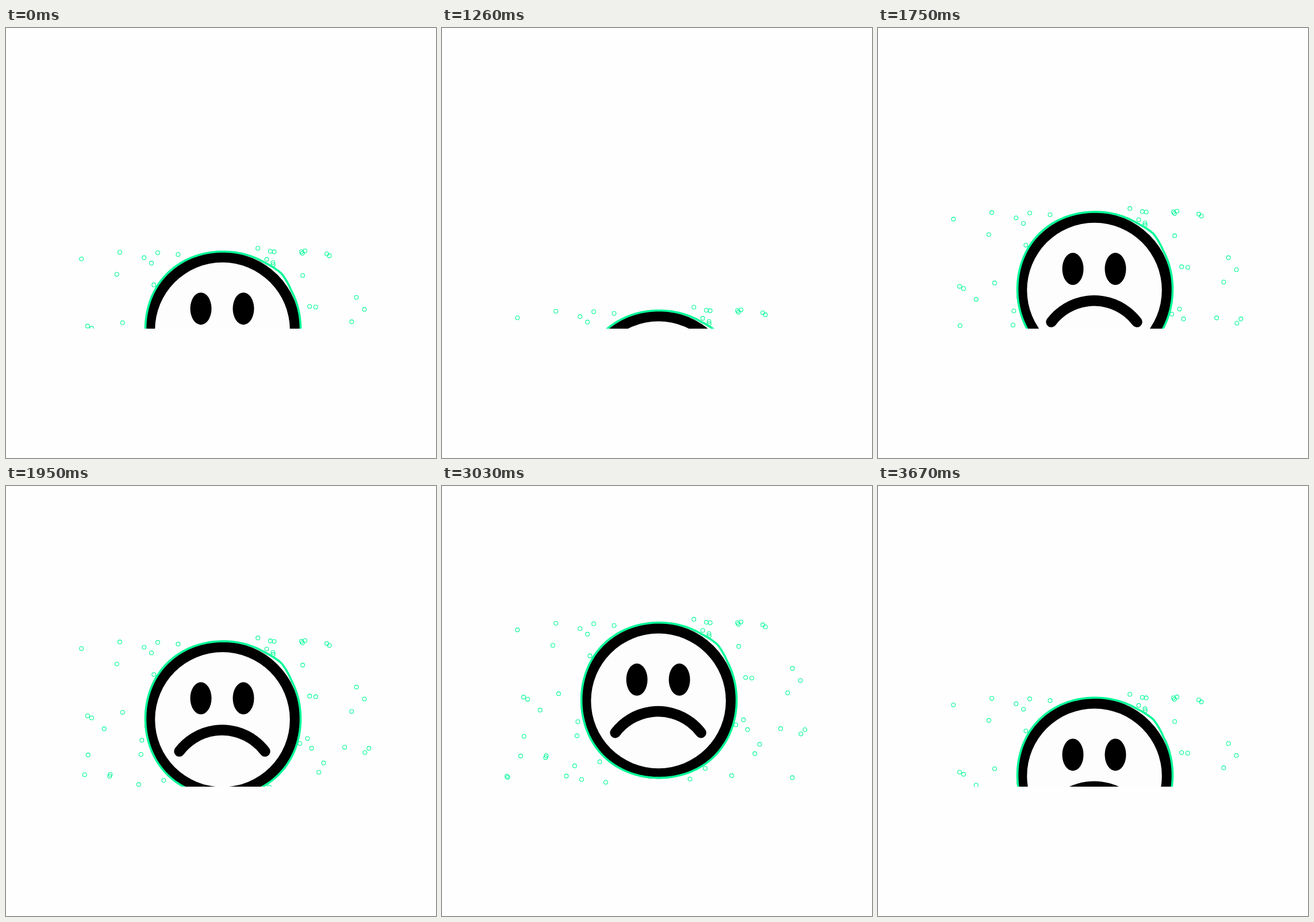
Recreate the animation shown at these times as an HTML page with a canvas. Size 748x748 px, loop 3730 ms.

```html
<!DOCTYPE html>
<html lang="en">
<head>
<meta charset="utf-8">
<title>Sad face</title>
<style>
  html, body { margin: 0; width: 100%; height: 100%; overflow: hidden; background: #fefefe; }
  canvas { display: block; }
</style>
</head>
<body>
<canvas id="stage" width="748" height="748"></canvas>
<script>
const ctx = document.getElementById('stage').getContext('2d');
const SIZE = 748, FLOOR = 523;
const PAPER = '#fefefe', INK = '#000', MINT = '#00fa96';
const CX = 376.5, CY = 373.5, FACE_RADIUS = 135.5;

// Cycle time counts from the moment the face starts to sink.
const LOOP = 3730, START = 700, HIDDEN = 1160, RISE = 1870, REST = 2970;
const PACE = [[0, 80], [400, 60], [760, 40], [RISE, 40], [2270, 60], [2570, 80]];

function seededRandom(seed) {
  return () => (seed = seed * 16807 % 2147483647) / 2147483647;
}

const random = seededRandom(4711);
const bubbles = [];

// Bubbles at random in a horizontal band, outside the face.
function scatter(count, top, bottom) {
  while (count > 0) {
    const x = 112 + random() * 520;
    const y = top + random() * (bottom - top);
    if (Math.hypot(x - CX, y - CY) < FACE_RADIUS + 4) continue;
    bubbles.push([x, y]);
    count--;
  }
}
scatter(17, 227, 261);
scatter(7, 270, 349);
scatter(30, 350, 516);

function ellipse(x, y, rx, ry = rx) {
  ctx.beginPath();
  ctx.ellipse(x, y, rx, ry, 0, 0, Math.PI * 2);
}

function stroke(color, width) {
  ctx.strokeStyle = color;
  ctx.lineWidth = width;
  ctx.stroke();
}

function fill(color) {
  ctx.fillStyle = color;
  ctx.fill();
}

// A slightly squarish circle with a small corner at the upper right.
function outlineRadius(angle) {
  const corner = Math.max(0, 1 - Math.abs(angle - 5.52) / 0.24);
  return 136 - Math.cos(4 * angle) + Math.cos(angle) - 1.2 * Math.sin(angle) + 3.5 * corner;
}

function traceOutline() {
  ctx.beginPath();
  for (let degree = 0; degree < 360; degree += 2) {
    const angle = degree * Math.PI / 180, r = outlineRadius(angle);
    ctx.lineTo(CX + r * Math.cos(angle), CY + r * Math.sin(angle));
  }
  ctx.closePath();
}

function drawFace() {
  for (const [x, y] of bubbles) {
    ellipse(x, y, 3.4);
    stroke(MINT, 1.1);
  }
  ellipse(CX, CY, FACE_RADIUS);
  fill(INK);
  ellipse(CX, CY, 117.3);
  fill('#fdfdfd');
  traceOutline();
  stroke(MINT, 3.6);

  for (const x of [339, 413]) {
    ellipse(x, 336.5, 18.5, 28);
    fill(INK);
  }
  const spread = 0.922;
  ctx.lineCap = 'round';
  ctx.beginPath();
  ctx.arc(376, 485.3, 93.5, -Math.PI / 2 - spread, -Math.PI / 2 + spread);
  stroke(INK, 18.5);
}

// The picture advances in steps that are longer near the resting place.
function stepTime(t) {
  const [start, step] = PACE.filter(p => p[0] <= t).pop();
  return start + Math.floor((t - start) / step) * step;
}

// Distance below the resting place: a sine ease out of and back into rest.
function sinkDepth(t) {
  const fromRest = t < RISE ? t + 32 : Math.max(0, REST - t);
  return 197 * (1 - Math.cos(Math.PI * fromRest / 1718));
}

function render(now) {
  const t = stepTime((now + START) % LOOP);
  ctx.fillStyle = PAPER;
  ctx.fillRect(0, 0, SIZE, SIZE);
  if (t >= HIDDEN && t < RISE) return;
  ctx.save();
  ctx.beginPath();
  ctx.rect(0, 0, SIZE, FLOOR);
  ctx.clip();
  ctx.translate(0, sinkDepth(t));
  drawFace();
  ctx.restore();
}

let origin = null;
function tick(now) {
  if (origin === null) origin = now;
  render(Math.max(0, now - origin));
  requestAnimationFrame(tick);
}
render(0);
requestAnimationFrame(tick);
</script>
</body>
</html>
```
